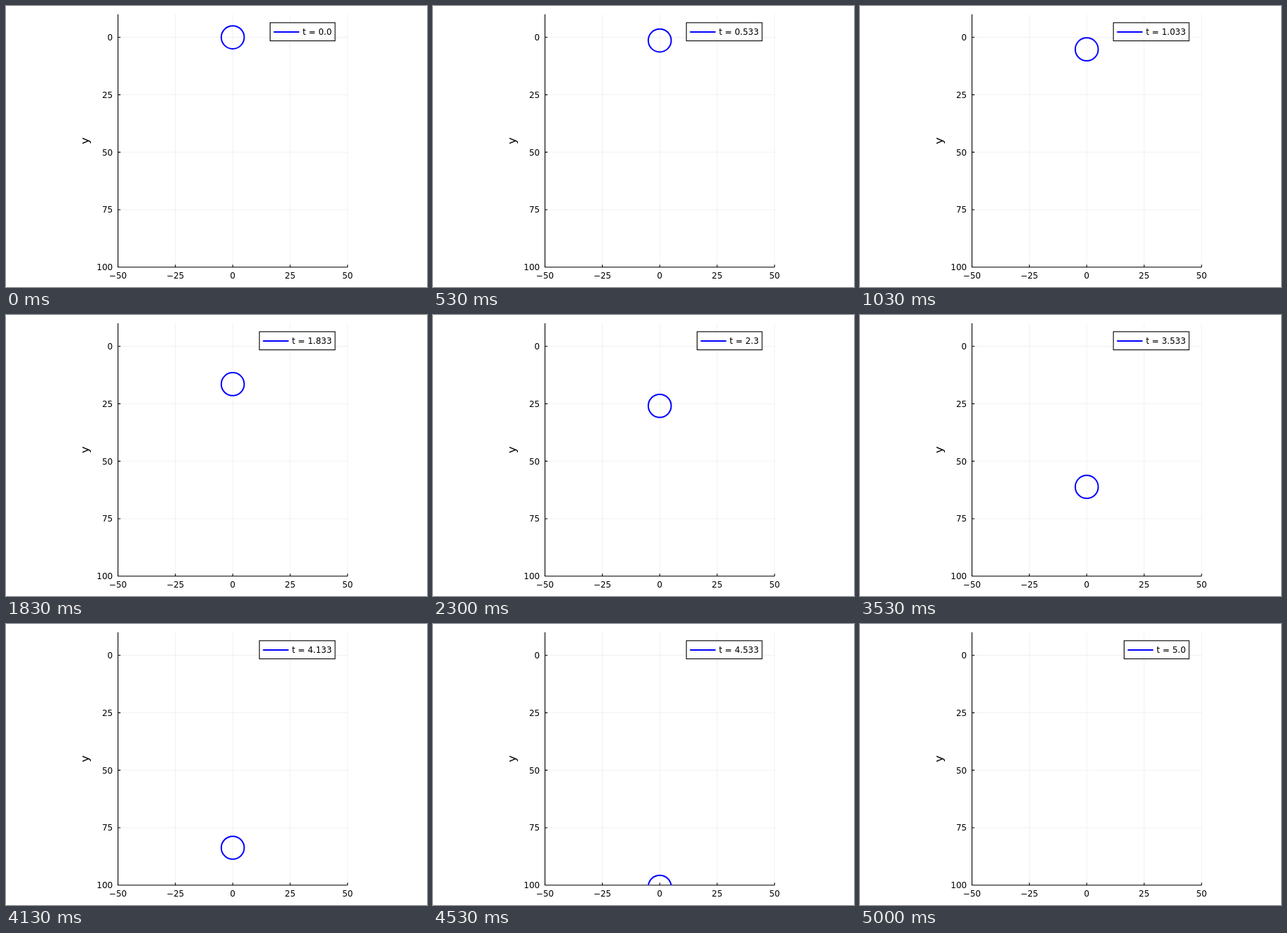
These frames come from a looping animation (600x400 px, 5030 ms). An HTML page:

```html
<!DOCTYPE html>
<html lang="en">
<head>
<meta charset="utf-8">
<title>Falling circle</title>
<style>
  html, body { margin: 0; height: 100%; overflow: hidden; background: #fff; }
  svg { display: block; font: 12px "DejaVu Sans", sans-serif; }
</style>
</head>
<body>
<svg width="600" height="400" viewBox="0 0 600 400">
  <clipPath id="area"><rect x="159.6" y="11.8" width="327.2" height="360"/></clipPath>
  <path id="grid" stroke="#000" stroke-opacity=".1" stroke-width=".6"/>
  <path id="axes" fill="none" stroke="#000" stroke-width="1.1"/>
  <g id="labels"></g>
  <text transform="translate(118 191.8) rotate(-90)" font-size="16.5" text-anchor="middle">y</text>
  <g clip-path="url(#area)">
    <circle id="ball" cx="323.15" r="16.36" fill="none" stroke="#00f" stroke-width="2"/>
  </g>
  <rect id="box" y="23.8" height="25.8" fill="#fff" stroke="#000" stroke-width="1.1"/>
  <path id="key" d="M381.5 36.9h36.5" stroke="#00f" stroke-width="2"/>
  <text id="time" x="464.3" y="41.3" text-anchor="end"></text>
</svg>
<script>
const $ = id => document.getElementById(id);
const SCALE = 360 / 110, LEFT = 159.6, RIGHT = 486.8, TOP = 11.8, BOTTOM = 371.8;
const DIGIT = 7.635, LOOP = 5030, FPS = 30;
const px = x => 323.15 + x * SCALE;
const py = y => TOP + (y + 10) * SCALE;

let grid = "", axes = `M${LEFT} ${TOP}V${BOTTOM}H${RIGHT}`, labels = "";
const label = (x, y, anchor, value) =>
  labels += `<text x="${x}" y="${y}" text-anchor="${anchor}">${String(value).replace("-", "\u2212")}</text>`;

for (let v = 0; v <= 100; v += 25) {
  const x = px(v - 50), y = py(v);
  grid += `M${x} ${TOP}V${BOTTOM}M${LEFT} ${y}H${RIGHT}`;
  axes += `M${x} ${BOTTOM}v-3.6M${LEFT} ${y}h3.6`;
  label(x, 387.5, "middle", v - 50);
  label(152.2, y + 4.4, "end", v);
}
$("grid").setAttribute("d", grid);
$("axes").setAttribute("d", axes);
$("labels").innerHTML = labels;

function draw(ms) {
  // steps of 1/30 s, shown on a 10 ms clock
  const step = Math.floor((Math.floor(ms / 10) + 0.5) * FPS / 100);
  const t = step / FPS;
  const text = Number.isInteger(t) ? t + ".0" : String(+t.toFixed(3));
  const extra = (text.length - 3) * DIGIT;
  $("ball").setAttribute("cy", py(4.9 * t * t));
  $("box").setAttribute("x", 376.4 - extra);
  $("box").setAttribute("width", 92.6 + extra);
  $("key").setAttribute("transform", `translate(${-extra})`);
  $("time").textContent = "t = " + text;
}

const start = performance.now();
function tick() {
  draw((performance.now() - start) % LOOP);
  requestAnimationFrame(tick);
}
tick();
</script>
</body>
</html>
```
